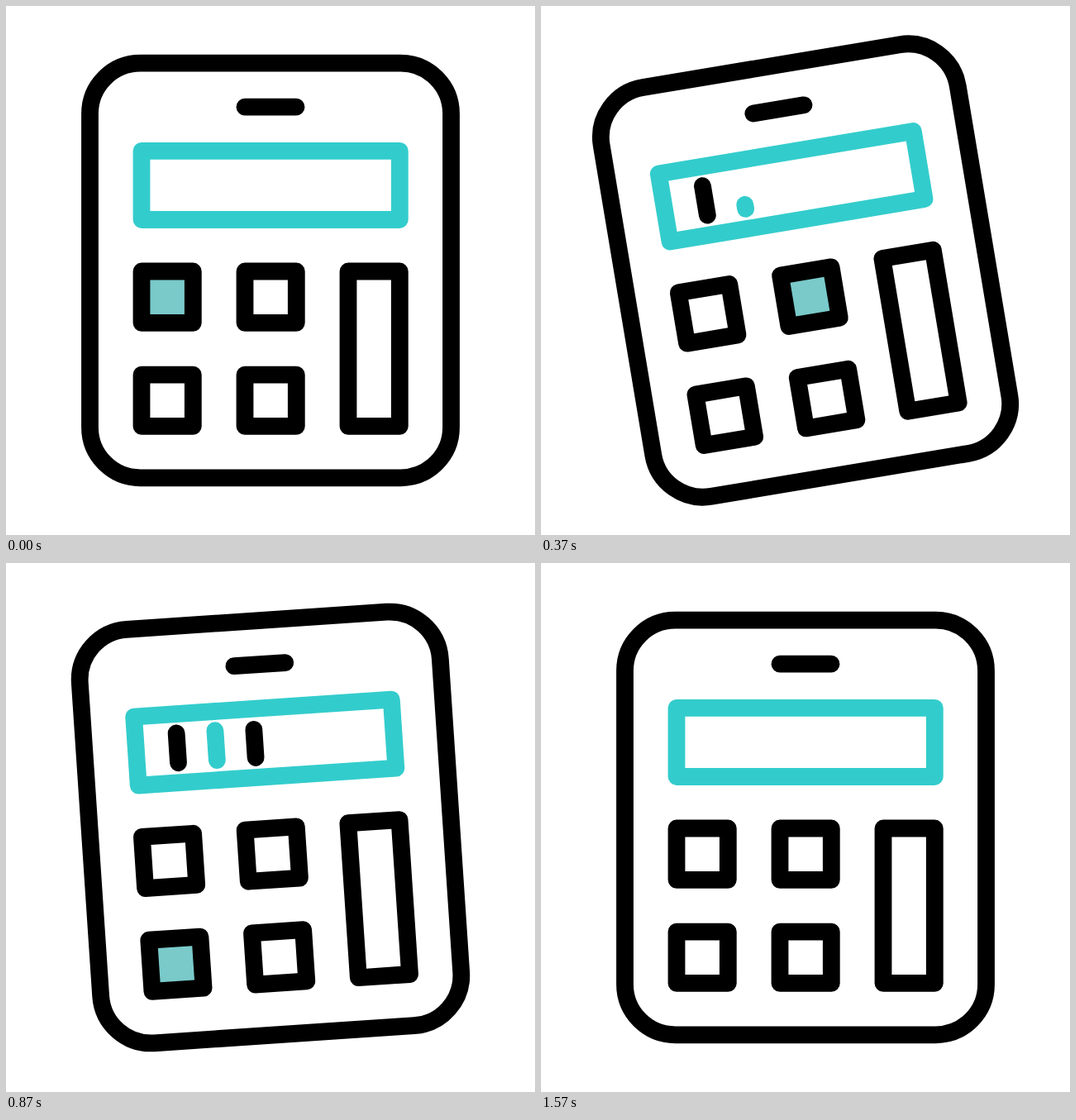
Recreate the animation shown at these times as an HTML page. Size 640 by 640 pixels, loop 1.67 s.

```html
<!DOCTYPE html>
<html lang="en">
<head>
<meta charset="utf-8">
<title>Calculator</title>
<style>
  html, body { margin: 0; width: 100%; height: 100%; overflow: hidden; background: #fff; }
  svg { display: block; width: 100vw; height: 100vh; }
  #calc { fill: none; stroke: #000; stroke-width: 20.8; stroke-linecap: round; stroke-linejoin: round; }
  .teal { stroke: #33cccc; }
  .on { fill: #7acaca; }
</style>
</head>
<body>
<svg viewBox="0 0 640 640">
  <g id="calc">
    <rect x="101.5" y="69.2" width="437" height="501.6" rx="61"/>
    <path d="M289 122.2H351"/>
    <rect class="teal" x="164" y="175.3" width="312.3" height="83.2"/>
    <rect class="key" x="164" y="321" width="62.3" height="62.3"/>
    <rect class="key" x="289" y="321" width="62.3" height="62.3"/>
    <rect class="key" x="164" y="446.1" width="62.3" height="62.3"/>
    <rect class="key" x="289" y="446.1" width="62.3" height="62.3"/>
    <rect x="414" y="321" width="62.3" height="187.4"/>
    <path class="bar"/>
    <path class="bar teal"/>
    <path class="bar"/>
    <path class="bar"/>
  </g>
</svg>
<script>
  const LOOP = 1670, TICK = 100 / 3;
  const calc = document.getElementById('calc');
  const keys = [...document.querySelectorAll('.key')];
  const bars = [...document.querySelectorAll('.bar')];

  // Times below are in ticks of 1/30 s.
  const sway = [[0, 0], [8, -17], [16.25, 8], [25, -4], [33, 0]];
  const barStart = [1.3, 9.1, 19.1, 27.5];
  const GROW = 8, PRESS = 9, CLEAR = 36, ERASE = 2.7;

  const ease = s => {
    s = Math.min(1, Math.max(0, s));
    return s * s * (3 - 2 * s);
  };

  function angle(n) {
    const i = sway.findIndex(k => k[0] > n);
    if (i < 0) return 0;
    const [t0, a] = sway[i - 1], [t1, b] = sway[i];
    return a + (b - a) * ease((n - t0) / (t1 - t0));
  }

  function drawBar(bar, i, n) {
    const erase = CLEAR + (bars.length - 1 - i) * ERASE;
    const shown = n > barStart[i] && n < erase + ERASE;
    const size = 36 * ease((n - barStart[i]) / GROW) * (1 - ease((n - erase) / ERASE));
    bar.setAttribute('d', shown ? `M${214 + 46.9 * i} 234.5v${-size - 0.01}` : '');
  }

  function draw(now) {
    const n = Math.floor((now % LOOP + 5) / TICK);
    calc.setAttribute('transform', `rotate(${angle(n)} 320 320)`);
    const pressed = Math.floor(n / PRESS);
    keys.forEach((key, i) => key.classList.toggle('on', i === pressed));
    bars.forEach((bar, i) => drawBar(bar, i, n));
  }

  let start;
  function loop(now) {
    start ??= now;
    draw(now - start);
    requestAnimationFrame(loop);
  }
  draw(0);
  requestAnimationFrame(loop);
</script>
</body>
</html>
```
